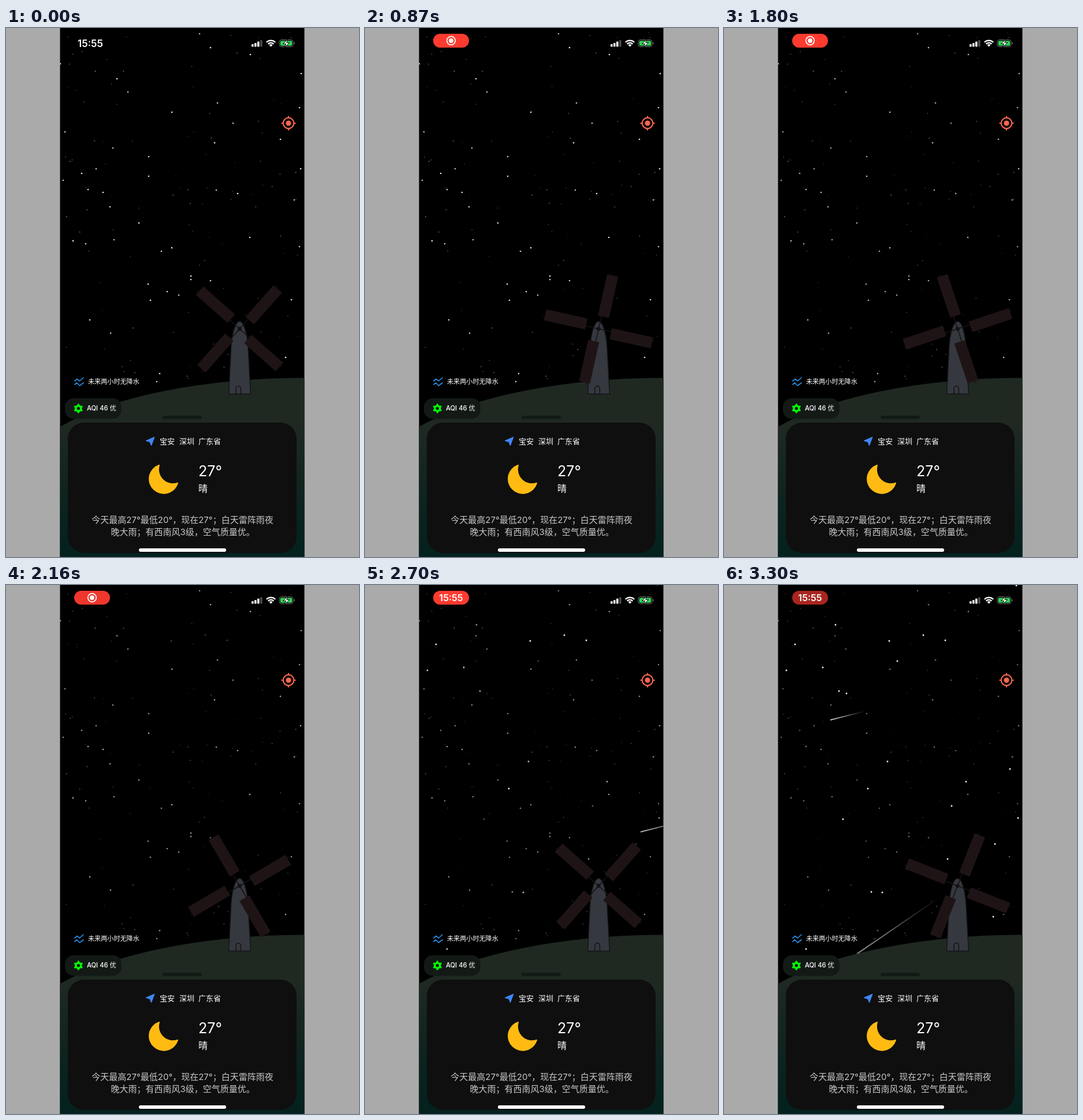
These frames come from a looping animation (611x917 px, 3330 ms). An HTML page:

```html
<!DOCTYPE html>
<html lang="zh-CN">
<head>
<meta charset="utf-8">
<title>天气</title>
<style>
html, body { margin: 0; width: 100%; height: 100%; overflow: hidden; background: #aaa; }
svg { display: block; width: 611px; height: 917px; }
text { font-family: Inter, "Noto Sans CJK SC", "Noto Sans CJK", sans-serif; fill: #fff; white-space: pre; }
.mid { font-weight: 500; }
.bold { font-weight: 600; }
</style>
</head>
<body>
<svg viewBox="0 0 611 917" xmlns="http://www.w3.org/2000/svg">
  <defs>
    <clipPath id="screen"><rect x="93.5" width="423" height="917"/></clipPath>
    <linearGradient id="ground" gradientUnits="userSpaceOnUse" x1="0" y1="685" x2="0" y2="917">
      <stop offset="0" stop-color="#1f2922"/>
      <stop offset=".6" stop-color="#0c231f"/>
      <stop offset="1" stop-color="#03211e"/>
    </linearGradient>
  </defs>
  <rect width="611" height="917" fill="#aaa"/>
  <g clip-path="url(#screen)">
    <rect x="93" width="424" height="917" fill="#000"/>
    <g id="stars" fill="#fff"></g>
    <g id="meteors"></g>
    <path d="M93 691.5A500 182 0 0 1 516 606.5H518V917H93Z" fill="url(#ground)"/>

    <g stroke="#131417" stroke-width="1.5">
      <path d="M385.5 634.5L389.6 553C391 530 397 508.5 404.3 508.5S417.5 530 419 553L423.5 634.5Z" fill="#36383f"/>
      <path d="M398 634.5V625a4.2 4.2 0 0 1 8.4 0V634.5" fill="none"/>
    </g>
    <g id="mill"></g>

    <rect x="102" y="642" width="98" height="35.5" rx="15" fill="#131a16"/>
    <rect x="271" y="672" width="68" height="6" rx="3" fill="#121a16"/>
    <rect x="107" y="684" width="396" height="226" rx="28" fill="#0f0f0f"/>
    <rect x="230" y="902" width="151" height="6" rx="3" fill="#fff"/>

    <g fill="none" stroke="#2a8be0" stroke-width="1.7" stroke-linecap="round" stroke-linejoin="round">
      <path d="M119 612l4-3.5 4.5 3.5 6.500-6"/>
      <path d="M119 618l3.500-3 5 5 6.500-5"/>
    </g>
    <text class="mid" x="142" y="616.700" font-size="11.1">未来两小时无降水</text>
    <path id="badge" fill="#0f0" stroke="#0f0" stroke-width="2" stroke-linejoin="round"/>
    <circle cx="125.300" cy="659.500" r="2.700" fill="#131a16"/>
    <text class="mid" x="140" y="663" font-size="11.2">AQI 46 优</text>

    <path d="M257 709L242 715.5 249 717.500 251.500 724Z" fill="#3f86f7" stroke="#3f86f7" stroke-linejoin="round"/>
    <g class="mid" font-size="13">
      <text x="266" y="720.500">宝安</text>
      <text x="300" y="720.500">深圳</text>
      <text x="333" y="720.500">广东省</text>
    </g>
    <path d="M265 758A25 25 0 1 0 297 789A25 25 0 0 1 265 758Z" fill="#ffbb12" stroke="#ffbb12" stroke-width="2" stroke-linejoin="round"/>
    <text x="333" y="777" font-size="25">27°</text>
    <text class="mid" x="333" y="804" font-size="16">晴</text>
    <g font-size="15" style="--c:#c8c8c8">
      <text x="305.500" y="858" text-anchor="middle" style="fill:#c8c8c8">今天最高27°最低20°，现在27°；白天雷阵雨夜</text>
      <text x="181.500" y="878.500" style="fill:#c8c8c8">晚大雨；有西南风3级，空气质量优。</text>
    </g>

    <g stroke="#f7674f" fill="none" stroke-width="2.2">
      <circle cx="489" cy="165" r="9.300"/>
      <path d="M489 152.500v4M489 173.500v4M476.500 165h4M497.500 165h4"/>
      <circle cx="489" cy="165" r="4.600" fill="#f7674f" stroke="none"/>
    </g>

    <g fill="#fff">
      <rect x="425" y="28" width="3.600" height="4.500" rx="1"/>
      <rect x="430" y="26" width="3.600" height="6.500" rx="1"/>
      <rect x="435" y="23.500" width="3.600" height="9" rx="1"/>
      <rect x="440" y="21" width="3.600" height="11.500" rx="1" opacity=".3"/>
      <path d="M458.500 32.500l-2.900-3a4.200 4.200 0 0 1 5.800 0z"/>
    </g>
    <g fill="none" stroke="#fff" stroke-width="2.300">
      <path d="M450.800 24.700a11 11 0 0 1 15.400 0"/>
      <path d="M453.600 27.700a7 7 0 0 1 9.800 0"/>
    </g>
    <rect x="473" y="20.500" width="24" height="12" rx="3.800" fill="#000" stroke="#777" stroke-width="1"/>
    <rect x="474.700" y="22.200" width="20.600" height="8.600" rx="2.300" fill="#32d158"/>
    <path d="M498.500 24.500v4q1.500-.6 1.500-2t-1.500-2z" fill="#777"/>
    <path d="M487.500 19.500L479.500 27.500H484.500L482.500 33.500 490.800 25.300H485.800Z" fill="#fff" stroke="#000" stroke-width="1"/>

    <text id="clock" class="bold" x="146" y="32.500" font-size="17" text-anchor="middle">15:55</text>
    <g id="pill">
      <rect x="118" y="10" width="62" height="24" rx="12" fill="#000"/>
      <rect id="red" x="118" y="10" width="62" height="24" rx="12" fill="#ff3b30"/>
      <g id="rec">
        <circle cx="149" cy="22" r="7.300" fill="none" stroke="#fff" stroke-width="1.700"/>
        <circle cx="149" cy="22" r="3.900" fill="#fff"/>
      </g>
      <text id="pillClock" class="bold" x="149" y="27.800" font-size="16" text-anchor="middle">15:55</text>
    </g>
  </g>
</svg>
<script>
const LOOP = 3330, STEP = 30;
const $ = id => document.getElementById(id);

function add(parent, tag, attrs) {
  const el = document.createElementNS("http://www.w3.org/2000/svg", tag);
  for (const k in attrs) el.setAttribute(k, attrs[k]);
  parent.appendChild(el);
  return el;
}

const clamp = v => Math.max(0, Math.min(1, v));
const ramp = (t, a, b) => clamp((t - a) / (b - a));
const mix = (a, b, k) => a + (b - a) * k;

let seed = 41;
const rand = () => (seed = (seed * 16807) % 2147483647) / 2147483647;

// Stars: one set dims, another lights up, faint ones fill the sky.
const fading = [
  335,10, 354,34, 423,46, 94,62, 511,79, 192,88, 211,111, 366,130, 508,138, 287,146,
  393,165, 102,180, 475,193, 361,199, 185,208, 247,223, 510,244, 156,244, 131,252, 247,257,
  99,264, 142,280, 168,285, 401,287, 499,298, 180,310, 230,338, 422,363, 116,369, 138,374,
  187,367, 508,379, 269,387, 287,381, 320,430, 320,436, 354,438, 246,444, 279,457, 299,463,
  250,472, 494,471, 145,506, 181,529, 484,571, 266,599, 261,613, 364,281];
const rising = [
  506,1, 193,69, 345,87, 286,97, 383,96, 123,103, 300,132, 171,143, 108,148, 199,184,
  212,188, 283,306, 495,319, 419,341, 249,353, 394,383, 206,406, 509,404, 469,449, 387,475,
  255,532, 466,575, 142,631, 274,533];

const stars = [];
function star(x, y, r, level) {
  stars.push({ el: add($("stars"), "circle", { cx: x, cy: y, r }), level });
}
for (let i = 0; i < fading.length; i += 2) {
  const peak = 0.72 + 0.23 * rand(), low = 0.3 + 0.2 * rand();
  star(fading[i], fading[i + 1], 1.35, t => mix(peak, low, ramp(t, 700, 3300)));
}
for (let i = 0; i < rising.length; i += 2) {
  const start = 2000 + 700 * rand();
  star(rising[i], rising[i + 1], 1.45, t => 0.95 * ramp(t, start, start + 600));
}
for (let i = 0; i < 105; i++) {
  const base = 0.15 + 0.35 * rand();
  star(95 + 420 * rand(), 610 * rand(), 0.7 + 0.35 * rand(), t => base * (1 - 0.3 * ramp(t, 600, 3300)));
}

// Meteors: head position at a given time, slope in degrees, tail length.
const meteors = [
  { at: 2700, x: 477, y: 428, deg: 14.2, len: 90, speed: 1, light: 0.7 },
  { at: 3300, x: 184, y: 234, deg: 14.3, len: 62, speed: 1, light: 0.75 },
  { at: 3300, x: 230, y: 639.5, deg: 34.4, len: 178, speed: 1, light: 0.6 }
];
meteors.forEach((m, i) => {
  const grad = add($("meteors"), "linearGradient", { id: "tail" + i, gradientUnits: "userSpaceOnUse", x1: 0, y1: 0, x2: m.len, y2: 0 });
  add(grad, "stop", { offset: 0, "stop-color": "#fff", "stop-opacity": m.light });
  add(grad, "stop", { offset: 0.4, "stop-color": "#fff", "stop-opacity": m.light * 0.75 });
  add(grad, "stop", { offset: 1, "stop-color": "#fff", "stop-opacity": 0 });
  m.el = add($("meteors"), "path", { d: `M0 -1L${m.len} -.5V.5L0 1Z`, fill: `url(#tail${i})` });
});

const mill = $("mill");
for (let i = 0; i < 4; i++) {
  const arm = add(mill, "g", { transform: `rotate(${i * 90})` });
  add(arm, "path", { d: "M0 0V-99", stroke: "#141214", "stroke-width": 1.6 });
  add(arm, "rect", { x: -6, y: -95.5, width: 19.5, height: 73, fill: "#1f1415" });
}
add(mill, "circle", { r: 3.4, fill: "#131316" });

let points = "";
for (let i = 0; i < 12; i++) {
  const r = i % 2 ? 4.6 : 7.4, a = i * Math.PI / 6 - Math.PI / 2;
  points += `${i ? "L" : "M"}${125.3 + r * Math.cos(a)} ${659.5 + r * Math.sin(a)}`;
}
$("badge").setAttribute("d", points + "Z");

function redLevel(t) {
  if (t < 2300) return mix(1, 0.88, ramp(t, 2000, 2300));
  if (t < 2750) return mix(0.88, 1, ramp(t, 2300, 2500));
  return mix(1, 0.66, ramp(t, 2750, 3300));
}

function draw(t) {
  mill.setAttribute("transform", `translate(404.3 521.5) rotate(${41.5 - t / 30})`);
  for (const s of stars) s.el.setAttribute("opacity", s.level(t).toFixed(3));
  for (const m of meteors) {
    const d = (m.at - t) * m.speed, a = m.deg * Math.PI / 180;
    m.el.setAttribute("transform",
      `translate(${m.x + d * Math.cos(a)} ${m.y - d * Math.sin(a)}) rotate(${-m.deg})`);
  }
  const shown = ramp(t, 60, 240), swap = ramp(t, 2310, 2490);
  $("clock").setAttribute("opacity", 1 - shown);
  $("pill").setAttribute("opacity", shown);
  $("red").setAttribute("opacity", redLevel(t));
  $("rec").setAttribute("opacity", 1 - swap);
  $("pillClock").setAttribute("opacity", swap);
}

const begin = performance.now();
function tick() {
  const t = (performance.now() - begin) % LOOP;
  draw(Math.floor(t / STEP) * STEP);
  requestAnimationFrame(tick);
}
draw(0);
requestAnimationFrame(tick);
</script>
</body>
</html>
```
